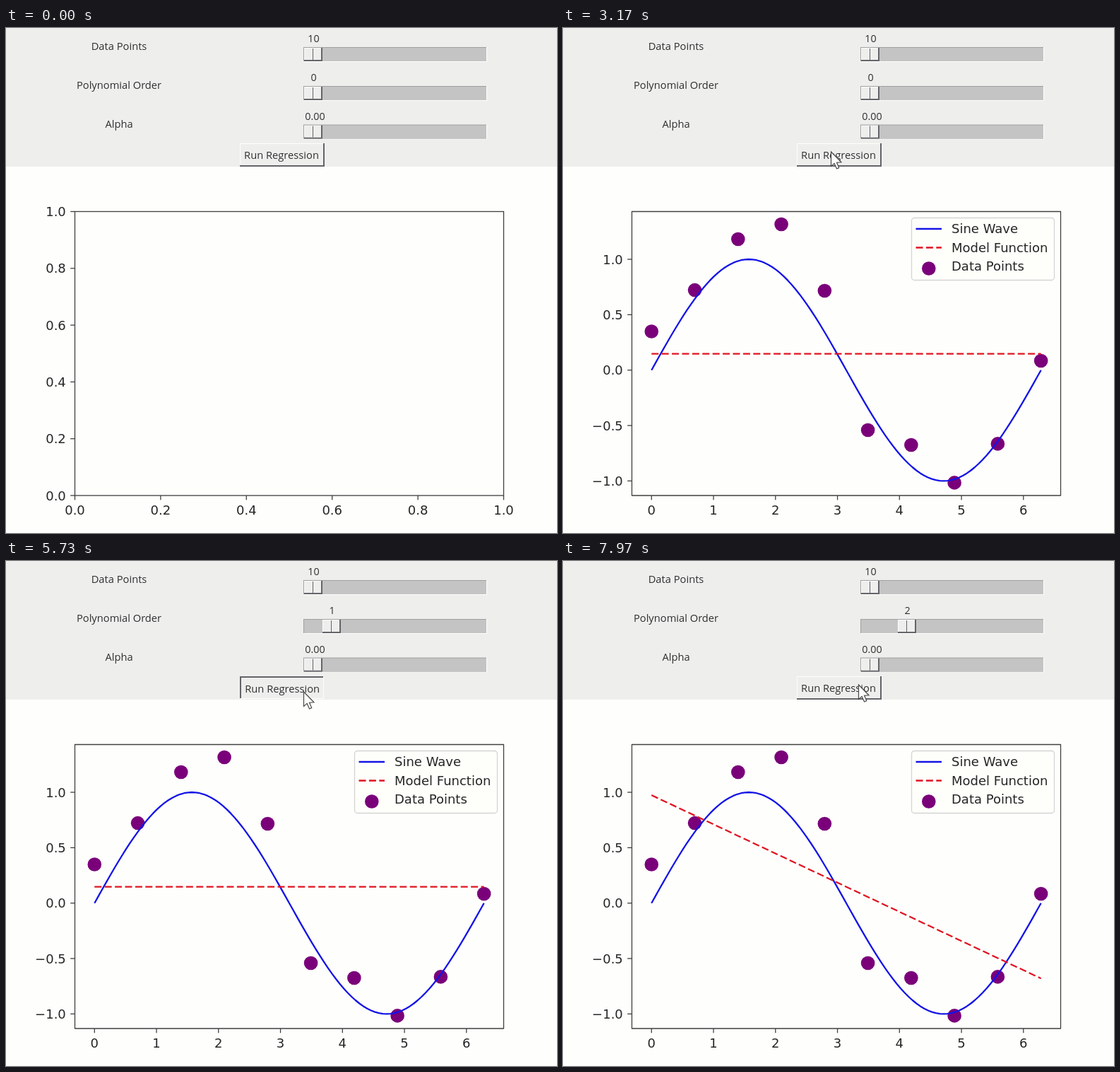
These frames come from a looping animation (780x714 px, 8000 ms). An HTML page with a canvas:

```html
<!DOCTYPE html>
<html lang="en">
<head>
<meta charset="utf-8">
<title>Regression demo</title>
<style>
  html, body { margin: 0; width: 780px; height: 714px; overflow: hidden; background: #fefefc; }
  canvas { display: block; }
</style>
</head>
<body>
<canvas id="stage" width="780" height="714"></canvas>
<script>
const ctx = document.getElementById('stage').getContext('2d');
const LOOP = 8000;
const UI = '"Open Sans", "Noto Sans", sans-serif';
const PLOT = '"DejaVu Sans", sans-serif';
const C = {
  paper: '#fefefc', panel: '#eeeeed', trough: '#c4c4c4', light: '#fefefc',
  dark: '#64646a', mid: '#a0a0a0', ui: '#303030', ink: '#262626', axis: '#404040',
  sine: '#1414e6', model: '#e01420', dot: '#7a007a', legend: '#d4d4d4'
};
const AX = { x: 97.5, y: 259.5, w: 607, h: 401.5 };
const TAU = Math.PI * 2;

// Noisy samples, evenly spaced over one period
const samples = [0.349, 0.722, 1.182, 1.316, 0.716, -0.541, -0.675, -1.016, -0.665, 0.084];
const sampleX = i => i * TAU / (samples.length - 1);
const px = x => 125.3 + x * 87.75;
const py = y => 483.7 - y * 156.7;

// Times of the user's actions
const CLICKS = [[2790, 2990], [5660, 5950]];
const DRAGS = [[4350, 5050], [6750, 7610]];
const ORDER_TIMES = [4560, 7080];
const PATH = [
  [1770, 345, 720], [2080, 380, 397], [2320, 381, 118], [2450, 381, 118],
  [2700, 379, 175], [3450, 379, 175], [3850, 424, 82], [4150, 432, 91],
  [4400, 432, 91], [4630, 447, 91], [4830, 458, 91], [5150, 458, 91],
  [5550, 421, 185], [6000, 421, 185], [6600, 469, 91], [6950, 469, 91],
  [7220, 492, 91], [7610, 492, 91], [7840, 408, 181], [7950, 418, 175]
];

const during = (t, spans) => spans.some(([a, b]) => t >= a && t < b);

function rect(x, y, w, h, color) {
  ctx.fillStyle = color;
  ctx.fillRect(x, y, w, h);
}

function text(s, x, y, size, font, color, align = 'center') {
  ctx.font = size + 'px ' + font;
  ctx.fillStyle = color;
  ctx.textAlign = align;
  ctx.fillText(s, x, y);
}

function stroke(points, color, width, dash = []) {
  ctx.beginPath();
  points.forEach(([x, y]) => ctx.lineTo(x, y));
  ctx.strokeStyle = color;
  ctx.lineWidth = width;
  ctx.setLineDash(dash);
  ctx.stroke();
  ctx.setLineDash([]);
}

function dot(x, y) {
  ctx.beginPath();
  ctx.arc(x, y, 9.8, 0, TAU);
  ctx.fillStyle = C.dot;
  ctx.fill();
}

// Box with a raised or sunken edge; a and b are the two edge widths
function bevel(x, y, w, h, face, topLeft, bottomRight, a, b) {
  rect(x, y, w, h, bottomRight);
  rect(x, y, w - b, h - b, topLeft);
  rect(x + a, y + a, w - a - b, h - a - b, face);
}

function slider(label, value, y, step, valueX, pressed) {
  text(label, 160, y + 4, 14.7, UI, C.ui);
  text(value, valueX, y - 7, 14.3, UI, C.ui);
  bevel(421, y, 260, 21, C.trough, C.mid, C.light, 1, 1);
  const x = 422 + step * 26;
  if (pressed) {
    bevel(x, y + 1, 26, 19, '#f6f6f4', C.mid, C.light, 1, 1);
    rect(x + 12, y + 3, 1, 15, C.mid);
  } else {
    bevel(x, y + 1, 26, 19, C.panel, C.light, C.dark, 1, 2);
    rect(x + 12, y + 2, 1, 16, C.dark);
  }
}

function button(down) {
  if (down) bevel(331, 163, 119, 32, C.panel, C.dark, C.light, 2, 1);
  else bevel(331, 163, 120, 33, C.panel, C.light, C.dark, 1, 2);
  const d = down ? 1.2 : 0;
  text('Run Regression', 390 + d, 184.5 + d, 14.7, UI, C.ui);
}

function axes(xTicks, yTicks) {
  ctx.strokeStyle = C.axis;
  ctx.lineWidth = 1.3;
  ctx.strokeRect(AX.x, AX.y, AX.w, AX.h);
  const bottom = AX.y + AX.h;
  for (const [x, s] of xTicks) {
    stroke([[x, bottom], [x, bottom + 6.3]], C.axis, 1.3);
    text(s, x, 688, 18, PLOT, C.ink);
  }
  for (const [y, s] of yTicks) {
    stroke([[AX.x - 6.3, y], [AX.x, y]], C.axis, 1.3);
    text(s, 84.8, y + 6.5, 18, PLOT, C.ink, 'right');
  }
}

function emptyPlot() {
  const ticks = [0, 1, 2, 3, 4, 5].map(i => [i / 5, (i / 5).toFixed(1)]);
  axes(ticks.map(([v, s]) => [AX.x + v * AX.w, s]),
       ticks.map(([v, s]) => [AX.y + (1 - v) * AX.h, s]));
}

// Least squares fit of order 0 or 1
function fit(order) {
  const n = samples.length;
  const mean = samples.reduce((a, b) => a + b) / n;
  let num = 0, den = 0;
  samples.forEach((y, i) => {
    const d = sampleX(i) - Math.PI;
    num += d * y;
    den += d * d;
  });
  const slope = order ? num / den : 0;
  return x => mean + slope * (x - Math.PI);
}

function legend() {
  ctx.beginPath();
  ctx.roundRect(493.5, 268.5, 202, 88, 4);
  ctx.fillStyle = 'rgba(254,254,252,.8)';
  ctx.fill();
  ctx.strokeStyle = C.legend;
  ctx.lineWidth = 1.3;
  ctx.stroke();
  stroke([[499.5, 284], [536, 284]], C.sine, 2.3);
  stroke([[499.5, 310.5], [536, 310.5]], C.model, 2.3, [10, 4.4]);
  dot(517.8, 340);
  ['Sine Wave', 'Model Function', 'Data Points'].forEach((s, i) =>
    text(s, 550, 290 + i * 26.7, 18, PLOT, C.ink, 'left'));
}

function fittedPlot(order) {
  const label = v => (v < 0 ? '\u2212' : '') + Math.abs(v).toFixed(1);
  axes([0, 1, 2, 3, 4, 5, 6].map(v => [px(v), String(v)]),
       [-1, -0.5, 0, 0.5, 1].map(v => [py(v), label(v)]));
  samples.forEach((y, i) => dot(px(sampleX(i)), py(y)));
  const wave = [];
  for (let i = 0; i <= 100; i++) {
    const x = i * TAU / 100;
    wave.push([px(x), py(Math.sin(x))]);
  }
  ctx.lineJoin = 'round';
  stroke(wave, C.sine, 2.3);
  const model = fit(order);
  stroke([0, TAU].map(x => [px(x), py(model(x))]), C.model, 2.3, [10, 4.4]);
  legend();
}

function cursor(t) {
  if (t < PATH[0][0]) return;
  let i = PATH.findIndex(k => k[0] > t);
  if (i < 0) i = PATH.length - 1;
  const [t0, x0, y0] = PATH[i - 1], [t1, x1, y1] = PATH[i];
  const u = Math.min(1, (t - t0) / (t1 - t0));
  const e = u * u * (3 - 2 * u);
  ctx.save();
  ctx.translate(x0 + (x1 - x0) * e + 0.5, y0 + (y1 - y0) * e);
  ctx.beginPath();
  [[0, 0], [0, 20.5], [4.6, 16.4], [8, 24], [11.2, 22.6], [8, 15.2], [14.4, 14.8]]
    .forEach(([x, y]) => ctx.lineTo(x, y));
  ctx.closePath();
  ctx.fillStyle = C.paper;
  ctx.fill();
  ctx.strokeStyle = '#484848';
  ctx.lineWidth = 1.2;
  ctx.lineJoin = 'miter';
  ctx.stroke();
  ctx.restore();
}

function draw(t) {
  const order = ORDER_TIMES.filter(s => t >= s).length;
  const runs = CLICKS.filter(c => t >= c[1]).length;
  rect(0, 0, 780, 714, C.paper);
  rect(0, 0, 780, 196, C.panel);
  slider('Data Points', '10', 27, 0, 435.5, false);
  slider('Polynomial Order', String(order), 82, order, 435.5 + order * 26, during(t, DRAGS));
  slider('Alpha', '0.00', 136.5, 0, 437.5, false);
  button(during(t, CLICKS));
  if (runs) fittedPlot(runs - 1);
  else emptyPlot();
  cursor(t);
}

let start;
function tick(now) {
  if (start === undefined) start = now;
  draw((now - start) % LOOP);
  requestAnimationFrame(tick);
}
draw(0);
requestAnimationFrame(tick);
</script>
</body>
</html>
```
